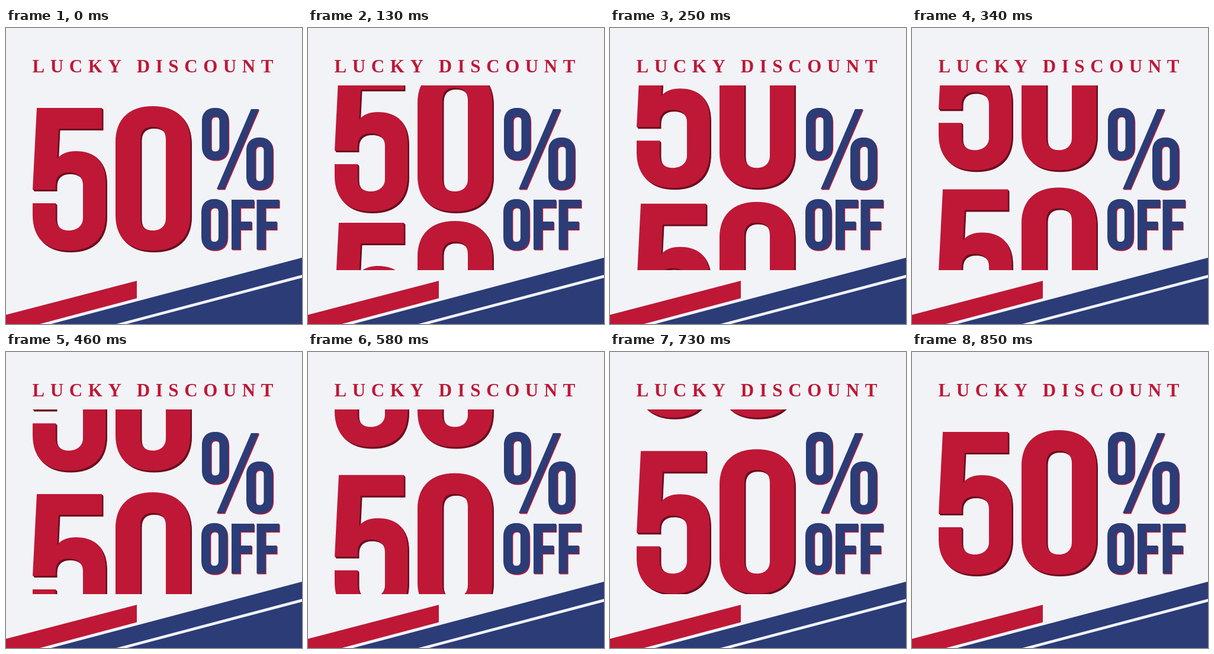
An HTML page for the animation above (1.25 s loop, 500x500 px).

```html
<!DOCTYPE html>
<html lang="en">
<head>
<meta charset="utf-8">
<title>Lucky Discount</title>
<style>
  html, body { margin: 0; width: 100%; height: 100%; overflow: hidden; background: #f2f3f7; }
  svg { display: block; width: 100vw; height: 100vh; }
  .red { fill: #be1836; }
  .blue { fill: #2b3c77; }
  .dark { fill: #6d0c1e; }
  .title { font: bold 31px "Liberation Serif", "Noto Serif", serif; letter-spacing: 9.6px; }
</style>
</head>
<body>
<svg viewBox="0 0 500 500" role="img" aria-label="Lucky discount, 50% off">
  <defs>
    <clipPath id="slot"><rect x="40" y="97" width="280" height="312"/></clipPath>
    <g id="fifty" fill-rule="evenodd">
      <path d="M52 135H162V170H89L86.500 221C93 212 104 208 118 208C150 208 168.500 225 168.500 260V316C168.500 354 147 376 107 376S45 354 45 316V296H84V321C84 335 93 342 106 342S130 335 130 321V265C130 251 120 244 106 244S84 251 84 265V273H45Z"/>
      <path d="M185 193C185 154 208 132 248 132S311.500 154 311.500 193V316C311.500 354 289 376 248 376S185 354 185 316ZM227 188V321C227 335 235 342 248 342S270 335 270 321V188C270 174 262 167 248 167S227 174 227 188Z"/>
    </g>
    <g id="digits">
      <g class="dark">
        <use href="#fifty" x="1" y="1"/>
        <use href="#fifty" x="2" y="2"/>
        <use href="#fifty" x="2.500" y="3"/>
      </g>
      <use href="#fifty" class="red"/>
    </g>
    <path id="ring" fill-rule="evenodd" d="M0 23C0 8 8 0 22.500 0S45 8 45 23V65C45 80 37 88 22.500 88S0 80 0 65ZM15.500 22V66C15.500 71 18 73.500 22.500 73.500S29.500 71 29.500 66V22C29.500 17 27 14.500 22.500 14.500S15.500 17 15.500 22Z"/>
    <path id="eff" d="M0 0H38V13.500H15V37H34V50.500H15V84H0Z"/>
    <g id="off">
      <use href="#ring" x="331" y="135"/>
      <use href="#ring" x="406" y="185"/>
      <path d="M414 137H427L369 272H356Z"/>
      <use href="#ring" transform="translate(330 289) scale(.98)"/>
      <use href="#eff" x="381" y="290"/>
      <use href="#eff" x="423.500" y="290"/>
    </g>
  </defs>

  <rect width="500" height="500" fill="#f2f3f7"/>
  <text class="title red" x="44.500" y="75">LUCKY DISCOUNT</text>

  <g clip-path="url(#slot)">
    <use id="leaving" href="#digits"/>
    <use id="arriving" href="#digits"/>
  </g>

  <use href="#off" class="red" x="1.200" y="1.500"/>
  <use href="#off" class="blue"/>

  <path class="red" d="M0 484.500L221 427V456.500L57 500H0Z"/>
  <path class="blue" d="M76 500L500 388V417L186 500Z"/>
  <path class="blue" d="M204 500L500 422V500Z"/>
</svg>
<script>
  const LOOP = 1250, START = 130, STEP = 30, STEPS = 24;
  const leaving = document.getElementById("leaving");
  const arriving = document.getElementById("arriving");
  const shift = (el, y) => el.setAttribute("transform", `translate(0 ${y.toFixed(2)})`);

  function draw() {
    const t = performance.now() % LOOP;
    const k = t < START ? STEPS : Math.min(STEPS, Math.floor((t - START) / STEP));
    shift(leaving, -66 - 9.96 * k);
    shift(arriving, 194 * (1 - k / STEPS));
    requestAnimationFrame(draw);
  }
  draw();
</script>
</body>
</html>
```
